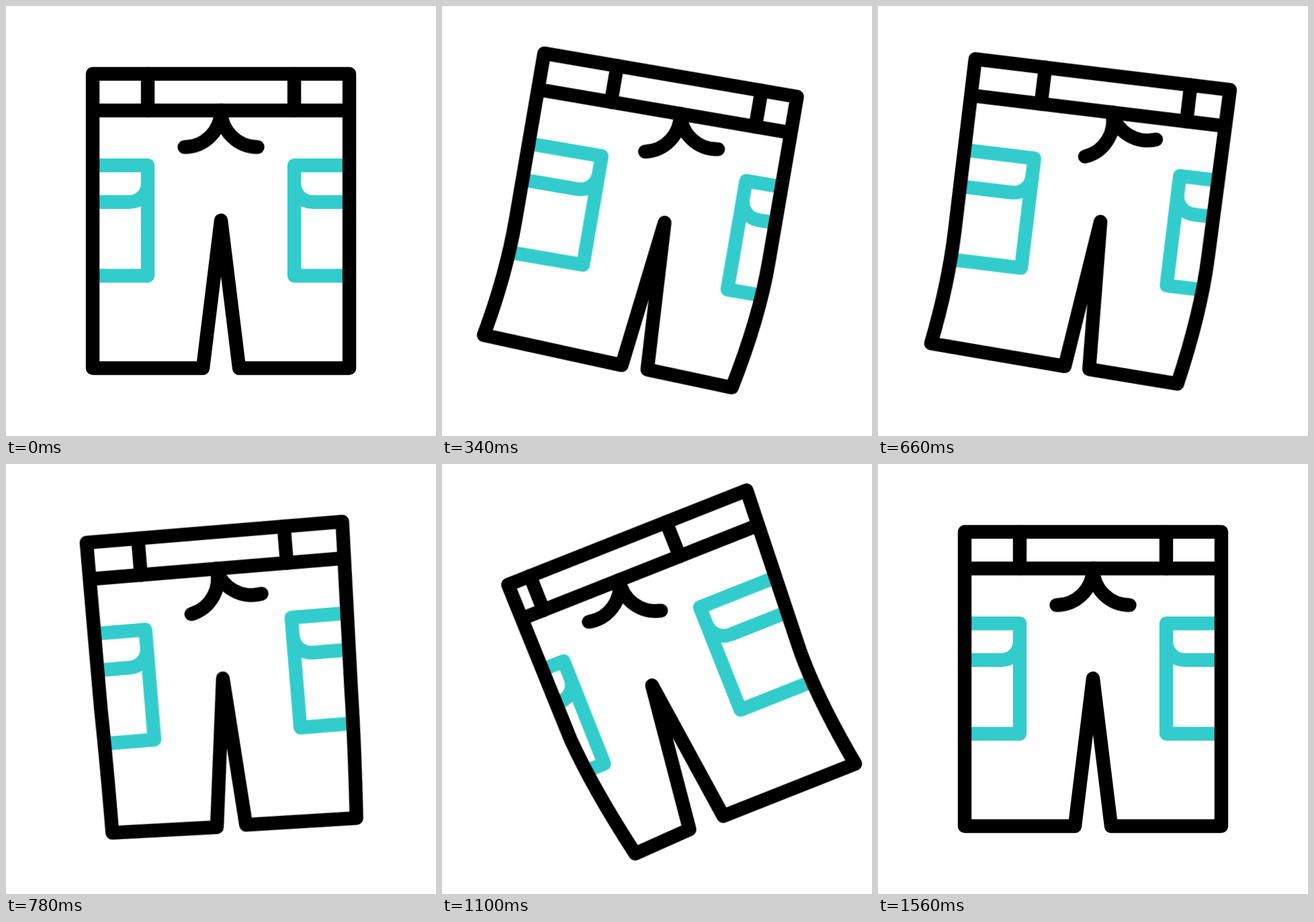
Recreate the animation shown at these times as an HTML page. Size 640x640 px, loop 2400 ms.

```html
<!DOCTYPE html>
<html lang="en">
<head>
<meta charset="utf-8">
<title>Swinging shorts</title>
<style>
  html, body { margin: 0; width: 100%; height: 100%; overflow: hidden; background: #fff; }
  svg { display: block; width: 100%; height: 100%; }
  .line { fill: none; stroke: #000; stroke-width: 20.4; stroke-linecap: round; stroke-linejoin: round; }
  .teal { stroke: #33cccc; }

  .swing, .slide, .knot, .string, .body {
    transform-origin: 0 0;
    animation: 2400ms cubic-bezier(.3333, 0, .6667, 1) infinite;
  }
  .swing { animation-name: swing; }
  .slide { animation-name: slide; }
  .knot { animation-name: knot; }
  .string { animation-name: string; }
  .body { animation-name: body; }

  @keyframes swing {
    0%, 63.3333%, 100% { transform: rotate(0deg); }
    21.6667% { transform: rotate(13.4deg); }
    43.3333% { transform: rotate(-22.6deg); }
  }
  @keyframes slide {
    0%, 63.3333%, 100% { transform: translateX(0px); }
    21.6667% { transform: translateX(39px); }
    43.3333% { transform: translateX(-49px); }
  }
  @keyframes knot {
    0%, 63.3333%, 100% { transform: translateX(0px); }
    21.6667% { transform: translateX(33px); }
    43.3333% { transform: translateX(-36px); }
  }
  /* the drawstring trails behind the body */
  @keyframes string {
    0%, 3.125%, 65%, 100% { transform: rotate(0deg); }
    24.5833% { transform: rotate(-22.2deg); }
    46.25% { transform: rotate(12.8deg); }
  }
  @keyframes body {
    0%, 63.3333%, 100% {
      d: path("M191 -120L191 130Q191 215 191 318L27 318L0 98L-27 318L-191 318Q-191 215 -191 130L-191 -120Z");
    }
    21.6667% {
      d: path("M191 -120L191 130Q191 215 160 325L44.7 318L39 98L12 318L-215.5 305Q-191 215 -191 130L-191 -120Z");
    }
    43.3333% {
      d: path("M191 -120L176.4 130Q173.5 207 191.5 318L-22 318L-49 98L-76 318L-161 322Q-185 207 -189 128L-191 -120Z");
    }
  }
</style>
</head>
<body>
<!-- origin sits on the swing pivot -->
<svg viewBox="-320 -221 640 640">
  <defs>
    <clipPath id="inside">
      <path class="body" d="M191 -120L191 130Q191 215 191 318L27 318L0 98L-27 318L-191 318Q-191 215 -191 130L-191 -120Z"/>
    </clipPath>
    <path id="pocket" d="M-280 16.3H-109V180.5H-280M-280 70.8H-136.3A27.3 27.3 0 0 0 -109 43.5"/>
    <path id="lace" d="M0 0A54.5 54.5 0 0 1 -54.5 54.5"/>
  </defs>
  <g class="swing">
    <g clip-path="url(#inside)">
      <g class="slide line teal">
        <use href="#pocket"/>
        <use href="#pocket" transform="scale(-1 1)"/>
      </g>
    </g>
    <path class="line body" d="M191 -120L191 130Q191 215 191 318L27 318L0 98L-27 318L-191 318Q-191 215 -191 130L-191 -120Z"/>
    <path class="line" d="M-186 -65.5H186"/>
    <path class="line slide" d="M-109 -120V-65.5M109 -120V-65.5"/>
    <g class="knot">
      <g transform="translate(0 -65.5)">
        <g class="string line">
          <use href="#lace"/>
          <use href="#lace" transform="scale(-1 1)"/>
        </g>
      </g>
    </g>
  </g>
</svg>
</body>
</html>
```
